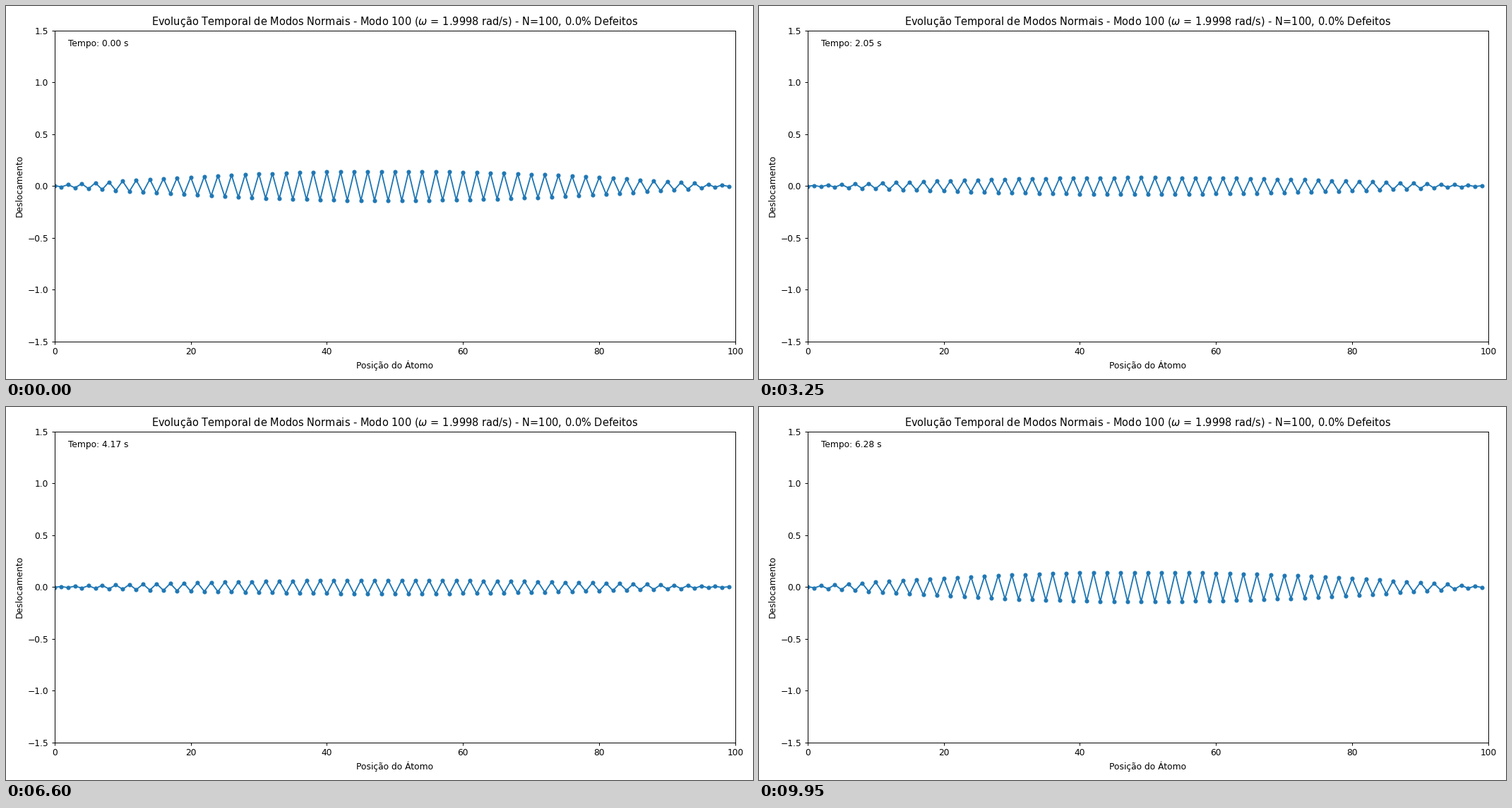
Animation, 1058 px wide and 529 px high, one loop 10000 ms. Source, as a matplotlib script:

```python
import numpy as np
import matplotlib.pyplot as plt
from matplotlib.animation import FuncAnimation

plt.rcParams["font.family"] = "DejaVu Sans"

N = 100            # atoms in the chain, both ends fixed
MODE = 100
FRAMES = 200
INTERVAL = 50      # ms
LAYOUT_DPI = 100   # margins are fitted at this resolution
STAGE_DPI = 88.167  # 12 x 6 in -> 1058 x 529 px

# Normal mode of a uniform chain with unit mass and stiffness
omega = 2 * np.sin(MODE * np.pi / (2 * (N + 1)))
sites = np.arange(N)
shape = np.sqrt(2 / (N + 1)) * np.sin(MODE * np.pi * (sites + 1) / (N + 1))
times = np.linspace(0, 4 * np.pi / omega, FRAMES)

fig, ax = plt.subplots(figsize=(12, 6), dpi=LAYOUT_DPI)
line, = ax.plot(sites, shape, "o-", color="#1f77b4", markersize=4)
clock = ax.text(0.02, 0.95, "", transform=ax.transAxes)

ax.set_xlim(0, N)
ax.set_ylim(-1.5, 1.5)
ax.set_xlabel("Posição do Átomo")
ax.set_ylabel("Deslocamento")
ax.set_title(
    f"Evolução Temporal de Modos Normais - Modo {MODE} "
    rf"($\omega$ = {omega:.4f} rad/s) - N={N}, 0.0% Defeitos",
    fontsize=11.95,
)
fig.tight_layout()
fig.set_dpi(STAGE_DPI)
fig.set_size_inches(12, 6)


def update(frame):
    t = times[frame]
    line.set_ydata(shape * np.cos(omega * t))
    clock.set_text(f"Tempo: {t:.2f} s")
    return line, clock


anim = FuncAnimation(fig, update, frames=FRAMES, interval=INTERVAL,
                     repeat=True, repeat_delay=0)
plt.show()
```
